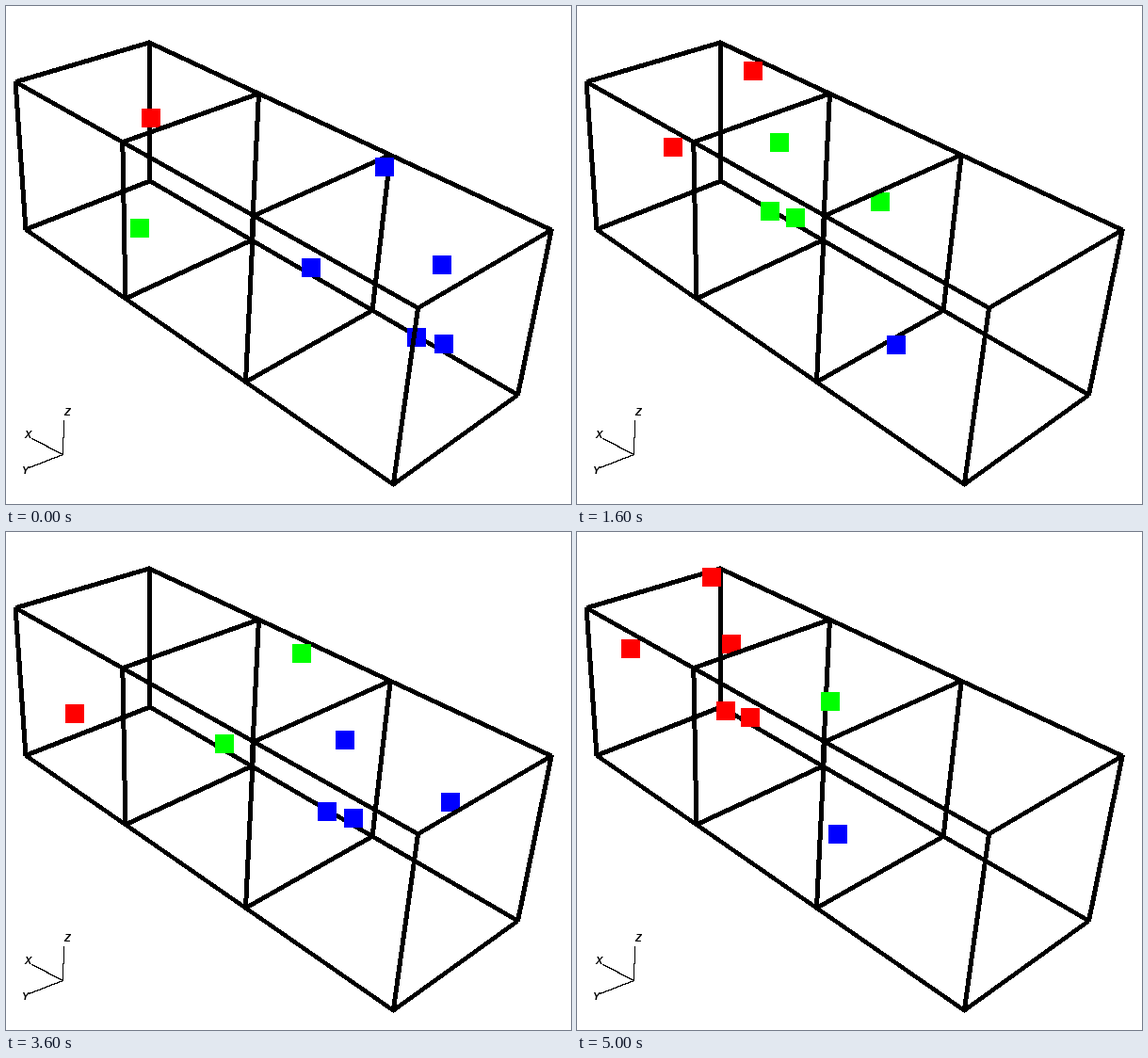
A matplotlib script for the animation above (5.1 s loop, 600x529 px).

```python
import numpy as np
import matplotlib.pyplot as plt
from matplotlib.animation import FuncAnimation
from matplotlib.collections import PolyCollection

W, H, DPI = 600, 529, 100
FRAMES, INTERVAL = 51, 100
CELLS, STEP = 3, 0.1           # cells in the row, cells travelled per frame
COLORS = ["#ff0000", "#00ff00", "#0000ff"]
HALF, STROKE = 10, 4
PIECES = 14                    # parts per edge for depth sorting

# Perspective camera: x runs along the row, y to the front, z up
VANISH = np.array([-1118, -553])
ORIGIN = np.array([16215, 9428])
FRONT = np.array([-2829, -139])
UP = np.array([-1071, -2371])

# Start of each particle as x, y, z in cells
PARTICLES = [
    (0.158, 0.118, 0.565),
    (1.067, 0.945, 0.480),
    (2.068, 0.126, 0.998),
    (2.324, 0.929, 0.838),
    (2.803, 0.575, 0.941),
    (2.683, 0.520, 0.440),
    (2.765, 0.398, 0.387),
]


def project(x, y, z):
    """Screen position and depth of a point."""
    depth = 12.759 - x - 1.006 * y - 0.836 * z
    return VANISH + (ORIGIN + y * FRONT + z * UP) / depth, depth


def strip(a, b, width):
    """Quad along a line, widened across its minor axis."""
    a, b = np.array(a), np.array(b)
    dx, dy = np.abs(b - a)
    off = np.array([width / 2, 0] if dy > dx else [0, width / 2])
    return [a - off, a + off, b + off, b - off]


def edge(p, q):
    """Short black quads from p to q, each with its depth."""
    points = [project(*c) for c in np.linspace(p, q, PIECES + 1)]
    return [((d0 + d1) / 2, strip(a, b, STROKE), "black")
            for (a, d0), (b, d1) in zip(points, points[1:])]


def build_box():
    ring = [(0, 0), (1, 0), (1, 1), (0, 1)]
    parts = []
    for x in range(CELLS + 1):
        for here, there in zip(ring, ring[1:] + ring[:1]):
            parts += edge((x, *here), (x, *there))
            if x < CELLS:
                parts += edge((x, *here), (x + 1, *here))
    return parts


def particle(x0, y, z, frame):
    """Coloured square drifting along x and wrapping around the row."""
    x = (x0 - STEP * frame) % CELLS
    center, depth = project(x, y, z)
    corners = HALF * np.array([(-1, -1), (1, -1), (1, 1), (-1, 1)])
    return depth, np.round(center) + corners, COLORS[int(x)]


fig = plt.figure(figsize=(W / DPI, H / DPI), dpi=DPI, facecolor="white")
ax = fig.add_axes([0, 0, 1, 1])
ax.set_xlim(0, W)
ax.set_ylim(H, 0)
ax.axis("off")

# Axis triad, hairline thin
hub = (60.5, 476.5)
triad = []
for label, tip, pos in [("X", (27.5, 459.5), (23, 459)),
                        ("Y", (24.5, 490.5), (20, 497)),
                        ("Z", (61.5, 440.5), (65, 435))]:
    triad.append((0, strip(hub, tip, 0.05), "black"))
    ax.text(*pos, label, family="Liberation Sans", style="italic", weight="bold",
            size=11 * 72 / DPI, ha="center", va="baseline")

fixed = build_box() + triad
scene = PolyCollection([], linewidths=0, edgecolors="none", antialiaseds=False)
ax.add_collection(scene, autolim=False)


def update(frame):
    shapes = fixed + [particle(*start, frame) for start in PARTICLES]
    shapes.sort(key=lambda s: -s[0])
    scene.set_verts([s[1] for s in shapes])
    scene.set_facecolor([s[2] for s in shapes])
    return [scene]


anim = FuncAnimation(fig, update, frames=FRAMES, interval=INTERVAL,
                     repeat=True, repeat_delay=0)
plt.show()
```
